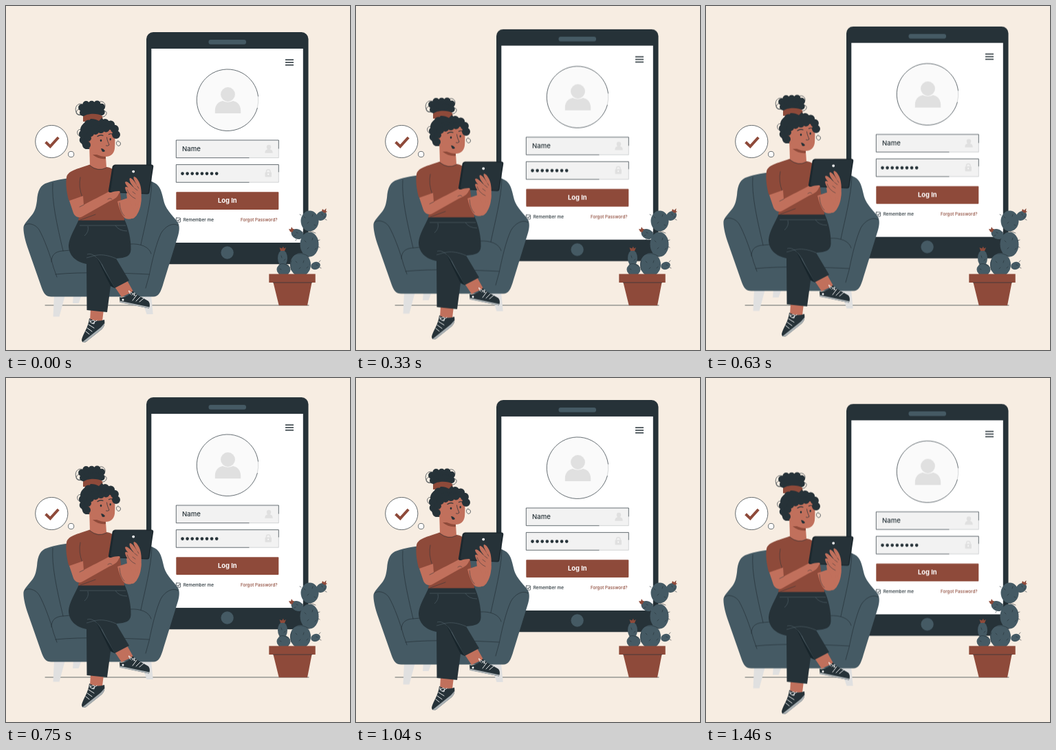
Animation of 500 by 500 pixels, one loop 1.5 s. Source, as an HTML page:

```html
<!DOCTYPE html>
<html lang="en">
<head>
<meta charset="utf-8">
<title>Log in illustration</title>
<style>
  html, body { margin: 0; width: 100%; height: 100%; overflow: hidden; background: #f7ede2; }
  svg { display: block; width: 100vw; height: 100vh; }
  .float { animation: float 1.5s linear infinite; }
  @keyframes float { 50% { transform: translateY(-10px); } }
  .ink { fill: #263238; }
  .slate { fill: #455a64; }
  .rust { fill: #8e4a3a; }
  .skin { fill: #c1705c; }
  .shade { fill: #8e4a3a; }
  .pale { fill: #e0e0e0; }
  .line { fill: none; stroke: #263238; stroke-width: .7; stroke-linecap: round; stroke-linejoin: round; }
  .soft { stroke-opacity: .35; stroke-width: .5; }
  .lace { fill: none; stroke: #fff; stroke-width: .9; stroke-linecap: round; }
  .bumps { fill: none; stroke: #263238; stroke-linecap: round; }
  text { font-family: Inter, "Open Sans", sans-serif; }
</style>
</head>
<body>
<svg viewBox="0 0 500 500">
  <path class="line" d="M57 435H440"/>

  <!-- phone -->
  <g class="float">
    <rect class="ink" x="204" y="38" width="235.5" height="337.3" rx="10"/>
    <rect x="211.3" y="62" width="220.5" height="282" fill="#fff"/>
    <rect class="slate" x="294.5" y="49" width="54.5" height="6.8" rx="3"/>
    <circle class="slate" cx="321.6" cy="358.5" r="9.2"/>
    <path class="line" style="stroke-width:1.4;stroke-linecap:butt" d="M406 78.3h12M406 82h12M406 85.7h12"/>

    <circle cx="321.8" cy="137" r="44.8" fill="#fafafa"/>
    <path class="line" d="M366.5 131A44.8 44.8 0 1 0 365.3 148.5"/>
    <path class="line soft" d="M366.5 131Q367.5 140 365.3 148.5"/>
    <circle class="pale" cx="322.5" cy="128.5" r="10.4"/>
    <path class="pale" d="M303.8 156V152C304 143 310 138.5 315 138Q322.5 141.5 330 138C335 138.5 341 143 341.2 152V156Z"/>

    <g fill="#f2f2f2">
      <rect x="247.3" y="195" width="149" height="25.7"/>
      <rect x="247.3" y="230.6" width="149" height="25.7"/>
    </g>
    <path class="line" d="M353 220.7H247.3V195H396.3V207M353 256.3H247.3V230.6H396.3V241"/>
    <path class="line soft" d="M353 220.7H396.3V207M353 256.3H396.3V241"/>
    <g class="pale">
      <circle cx="382" cy="205" r="3.2"/>
      <path d="M376.3 213.7C376.3 209.5 379 208 382 208S387.7 209.5 387.7 213.7Z"/>
      <rect x="376.5" y="241.5" width="9.5" height="7" rx="1"/>
    </g>
    <path d="M378.5 242V240A2.8 2.8 0 0 1 384 240V242" fill="none" stroke="#e0e0e0" stroke-width="1.4"/>
    <circle cx="381.2" cy="244.6" r="1" fill="#fff"/>
    <text class="ink" x="256" y="210.7" font-size="9.6" font-weight="500">Name</text>
    <path class="bumps" stroke-width="4.7" stroke-dasharray="0 7.1" d="M256.5 243.6H306.8"/>

    <rect class="rust" x="247.3" y="270.3" width="149" height="25.8" rx="1"/>
    <text x="321.8" y="286.4" font-size="9.4" font-weight="700" fill="#fff" text-anchor="middle">Log In</text>
    <rect class="line" x="247.3" y="308" width="6.2" height="6.2" rx=".6"/>
    <path class="line" style="stroke-width:1" d="M248.7 311.1l1.4 1.5 2.4-2.9"/>
    <text class="ink" x="257.7" y="313.4" font-size="6.4" font-weight="500">Remember me</text>
    <text class="rust" x="341" y="313.4" font-size="6.25" font-weight="500">Forgot Password?</text>
  </g>

  <!-- thought bubble -->
  <g fill="#fff" stroke="#263238" stroke-width=".7">
    <circle cx="66.3" cy="197" r="23.6"/>
    <circle cx="94.6" cy="215.5" r="4.1"/>
  </g>
  <path d="M57.6 197.8L64.3 204.2L76.2 191" fill="none" stroke="#8e4a3a" stroke-width="4"/>

  <g class="float">
    <!-- armchair -->
    <path class="pale" d="M70 420H86L77.5 451.5H68.5ZM98 420H110L105.5 432H97ZM195 420H211L213.7 448H204.5Z"/>
    <path class="slate" d="M45 283C46 268 50 260 60 257C72 253 84 250.5 98 250H190C202 251 212 254 219 259C226 265 227 275 230 286C233 297 246 308 250.5 316C252.5 321 252 327 250 334L229 402C225 416 222 422.5 214 422.5H66C58 422.5 55 418 52 410L31 350C27 338 25 327 25.5 321C27 315 34 309 39 302C43 296 44 290 45 283Z"/>
    <path class="line" d="M27 319C31 314 43 317 48 325C55 337 65 364 69 380L74 394M250 319C243 314 231 320 225 331C218 346 212 372 208 392L203 410M66 372C66 362 71 357 82 356L94 355M180 346C196 345 208 350 211 360M72 390C110 386 170 388 208 390M68 257C66 282 74 318 83 356M212 256C211 285 202 318 196 347"/>

    <!-- hair behind the face -->
    <path class="line" d="M112 143C102 139 98 151 104 157C109 161 115 156 112 151M132 142C140 134 147 143 143 148M140 153C150 150 147 163 138 161M108 158C101 160 100 152 106 150M163 196C158 197 161 205 165 203C168 201 166 196 163 197M110 180C102 177 102 188 107 189"/>
    <ellipse class="ink" cx="125" cy="150" rx="14" ry="9"/>
    <path class="bumps" stroke-width="10" stroke-dasharray="0 8" d="M112 155C105 147 115 141 124 143C134 140 143 146 139 154C134 160 119 160 114 156"/>
    <path class="rust" d="M112 161C117 156 133 155 140 160L141 168H112Z"/>
    <ellipse class="ink" cx="133" cy="180" rx="25" ry="16"/>
    <path class="ink" d="M109 176H128V208H116Q108 202 109 190Z"/>

    <!-- neck, face -->
    <path class="skin" d="M121 198L122 233Q133 244 146 235L144.5 212Z"/>
    <path class="shade" d="M126 216C132 221 139 223 145 222L145 216Z"/>
    <path class="skin" d="M122 181C133 184 143 177 157 181C159 190 158.5 199 158 207C157 215 152 219 145 219C136 219 128 215 124 208C118 207 115 203 117 198C118 194 121 195 122 197Z"/>
    <g class="line">
      <path d="M133 189.5Q137 186.5 141 188.2M149.5 186.5Q153 184.8 155.5 187" stroke-width="1.2"/>
      <path d="M146.5 191C147 196 149 199 150 202Q148 204 145.5 203M118 199Q121 198 121 202"/>
    </g>
    <ellipse class="ink" cx="138" cy="195.5" rx="1.3" ry="1.7"/>
    <ellipse class="ink" cx="151.7" cy="193.8" rx="1.2" ry="1.7"/>
    <path class="ink" d="M138 207Q142 207 144 211Q141 213 139.5 211Z"/>
    <path class="bumps" stroke-width="12" stroke-dasharray="0 8.5" d="M117 202C109 193 111 182 117 175C122 166 134 166 143 170C153 170 160 178 160 187"/>
    <path class="bumps" stroke-width="10" stroke-dasharray="0 8" d="M119 192C120 182 132 182 151 177"/>
    <path class="rust" d="M112 164C118 158 132 157 139 163L135 167C128 163 119 163 113 168Z"/>

    <!-- trousers and shoes -->
    <path class="skin" d="M156 405L175 397L185 415L168 423ZM123 441H142L140 458L122 457Z"/>
    <path class="ink" d="M106 310H172C178 322 182 340 181.5 354C181 364 174 366 160 367L179 399L158 410L152 407L147 445L117.5 442L117 375C101 372 91 362 91 348C92 335 101 323 106 310Z"/>
    <path d="M118 361C125 358 134 366 139 375L157 409M139 375L152 404M117 366C127 364 136 357 160 367M119 320Q121 328 114 334M159 319Q164 327 176 327M107 319H174" fill="none" stroke="#55656d" stroke-width=".6"/>
    <path d="M130 362L158 410L152 407L146 395Z" fill="#18252b"/>
    <path class="ink" d="M165 423C170 425 180 421 184 414C191 421 201 425 207 429C210 433 209 438 207.5 439.5L165.5 430.5Z"/>
    <path d="M165.3 428.5L208.5 437.5L207.5 439.5L165.5 431Z" fill="#a9b0b3"/>
    <path class="lace" d="M181 419Q176 411 180 415L188 421M184 428L190 420M189 429L195 423M194 430L200 425M183 420Q190 413 186 421"/>
    <path class="ink" d="M121 454Q131 460 143 456C144 462 143 466 139 470L119 486C115 490 110 490 110 485C111 478 120 467 121 454Z"/>
    <path d="M143.2 461Q143 466 139 470L118 487Q113 490 111 488.5L138 467Z" fill="#a9b0b3"/>
    <path class="lace" d="M120 463L128 468M118 468L125 473M116 473L121 477M122 459Q131 453 128 462Q121 461 122 456M126 461L132 457"/>
    <circle cx="170" cy="427" r="1.5" fill="#fff"/>

    <!-- shirt, far arm -->
    <path class="skin" d="M154 290L184 309C191 307 197 292 196.5 280L193 262L174 264L176 280L166 286Z"/>
    <path class="rust" d="M121.5 230.5C128 237 139 239 146.5 234C153 235 160 239 163 247L168 288C170 295 172 303 172 311.5H105L108 293L91 282C88 270 86.5 258 88 249C90 239 104 237 121.5 230.5Z"/>
    <path class="skin" d="M162 284L177 279L190 304Q182 312 174 309Q167 305 162 284Z"/>
    <path class="line" d="M122 232Q134 242 146 235M108 249Q105 263 111 278M108 311L130 303M165 286Q166 300 172 305" style="stroke-width:.5"/>

    <!-- near arm, tablet, hand -->
    <path class="skin" d="M92 283L112 276L113 289C125 282 139 276 149 270L165 269C164 277 158 281 150 284L111 306C106 309 100 306 98 301Z"/>
    <path class="line" style="stroke-width:.5" d="M113 289L107 292M148 281Q152 278 154 281"/>
    <path d="M158.5 230.5H212Q214.8 231 214.2 234L208.5 271Q208 273.7 205 273.5L151 271Q148.5 270.5 149 268L154.5 234Q155 231 158.5 230.5Z" fill="#1d282e"/>
    <path class="ink" d="M160 232H211Q213 232 212.5 234.5L207 270Q206.7 272 204 272L154 270Q151.7 270 152 268L157 234.5Q157.5 232 160 232Z"/>
    <circle cx="185.2" cy="240.6" r="1.9" fill="#fff"/>
    <path class="skin" d="M187 282C179 277 174 270 173 264C175 260 180 266 184 270C178 265 173 259 173 256C176 253 182 261 187 265C182 259 178 253 180 250C184 250 188 257 191 262C188 256 184 250 186 248C190 248 195 257 196 264C197 270 197 278 196 286L189 291Z"/>
    <path class="line" style="stroke-width:.5" d="M184 270L188 273M187 265L191 268M191 262L193 265M176 267Q179 276 188 280"/>
    <path class="skin" d="M148 274C151 270 160 269 165 269L166 271L158 277Q157 282 154 280Z"/>
  </g>

  <!-- cactus -->
  <g class="slate">
    <ellipse cx="403.5" cy="383" rx="10" ry="9"/>
    <ellipse cx="402" cy="366.5" rx="7" ry="11.5"/>
    <ellipse cx="428" cy="376" rx="15" ry="17"/>
    <ellipse cx="450" cy="377.5" rx="7" ry="5.5" transform="rotate(-18 450 377.5)"/>
    <ellipse cx="441" cy="346.5" rx="13.5" ry="18"/>
    <ellipse cx="423.5" cy="331.5" rx="9.5" ry="7" transform="rotate(24 423.5 331.5)"/>
    <ellipse cx="441.5" cy="312.5" rx="13" ry="15"/>
    <ellipse cx="458.5" cy="305" rx="8" ry="6.5" transform="rotate(-35 458.5 305)"/>
  </g>
  <path class="rust" d="M459 298L460 295L462.5 297L465.5 294L465 298L467 299L463 301ZM413 328L411 324L414 324.5L415 321L417 324L419 324L416 329ZM399 356L397.5 351L401 352.5L403 349.5L404 352.5L407 351L405 356Z"/>
  <g class="line" style="stroke-width:.6">
    <path d="M430 329Q441 325 450 330M418 362Q430 356 441 365M397 376Q403 372 410 378M415 384Q412 376 415 370"/>
    <path d="M433 306l2 2M446 303l-1 3M438 316l2-2M448 318l2 1M434 341l2 2M446 337l-1 3M438 353l2-2M449 354l2-2M421 371l2 2M433 370l-1 3M426 382l2-2M437 381l2-2M400 363l1 3M404 370l2-2M398 382l2 1M422 329l2 1M419 334l2-1M459 302l1 2M462 307l2-1M451 376l2 1M453 341l3-1M454 350l2 1M429 304l-2-1M464 310l2 1M422 339l-1 2M455 372l2-2M456 380l2 1"/>
  </g>
  <path class="rust" d="M382.3 389.5H449.7V402H444.5L438 435.2H396.7L388.5 402H382.3Z"/>
  <path class="line" d="M388.5 402H444.5"/>
</svg>
</body>
</html>
```
